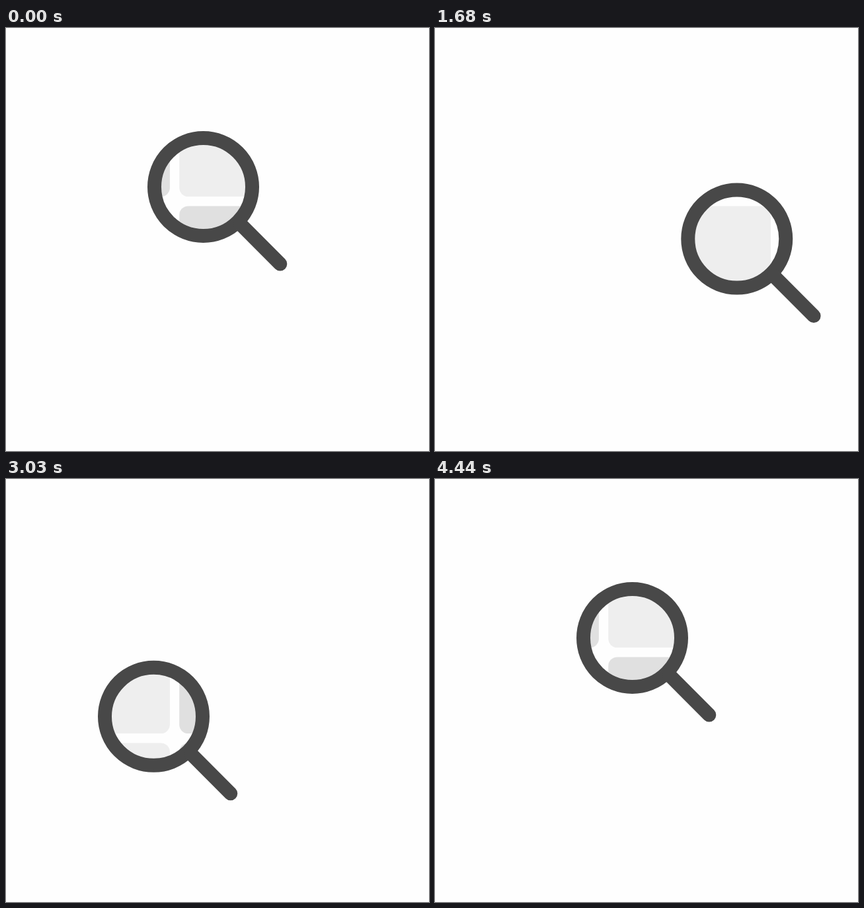
These frames come from a looping animation (640x640 px, 4.53 s). An HTML page:

```html
<!DOCTYPE html>
<html lang="en">
<head>
<meta charset="utf-8">
<title>Searching</title>
<style>
  html, body { margin: 0; width: 100%; height: 100%; overflow: hidden; background: #fefefe; }
  svg { display: block; width: 100%; height: 100%; }
</style>
</head>
<body>
<svg viewBox="0 0 640 640">
  <defs>
    <clipPath id="lens"><circle id="hole" r="66"/></clipPath>
  </defs>
  <g id="cells" clip-path="url(#lens)"></g>
  <g id="glass" fill="none" stroke="#484848" stroke-width="21" stroke-linecap="round">
    <circle r="74"/>
    <path d="M56 56L116.3 116.5"/>
  </g>
</svg>
<script>
const NS = 'http://www.w3.org/2000/svg';
const LOOP = 4530, STEP = 30;
const $ = id => document.getElementById(id);

function make(tag, attrs) {
  const el = document.createElementNS(NS, tag);
  for (const k in attrs) el.setAttribute(k, attrs[k]);
  return el;
}

// Tiles seen only through the lens
const DARK = '#e0e0e0', LIGHT = '#eeeeee';
['101', '010', '010'].forEach((row, r) => [...row].forEach((on, c) => {
  $('cells').append(make('rect', {
    x: 132.2 + 130 * c, y: 139.4 + 130 * r,
    width: 115.7, height: 115.7, rx: 13.5,
    fill: on === '1' ? DARK : LIGHT
  }));
}));

// Each leg is travelled at constant speed until its end step
const legs = [
  [37, 'M298.5 240.5C351.9 321 444.5 562.7 458.6 482.1'],
  [74, 'M458.6 482.1C472.6 401.5 448 175 414 175'],
  [111.17, 'M414 175C356 175 158.4 448.4 158.4 435.4'],
  [148, 'M158.4 435.4C158.4 422.4 251.8 305.5 298.5 240.5']
].map(([end, d], i, all) => {
  const path = make('path', { d });
  return { start: i ? all[i - 1][0] : 0, end, path, len: path.getTotalLength() };
});

function position(step) {
  const leg = legs.find(l => step <= l.end);
  const p = (step - leg.start) / (leg.end - leg.start);
  return leg.path.getPointAtLength(p * leg.len);
}

function draw(ms) {
  const step = Math.min(148, Math.floor((ms % LOOP) / STEP));
  const { x, y } = position(step);
  const move = `translate(${x.toFixed(2)} ${y.toFixed(2)})`;
  $('glass').setAttribute('transform', move);
  $('hole').setAttribute('transform', move);
}

const began = performance.now();
function tick() {
  draw(performance.now() - began);
  requestAnimationFrame(tick);
}
tick();
</script>
</body>
</html>
```
